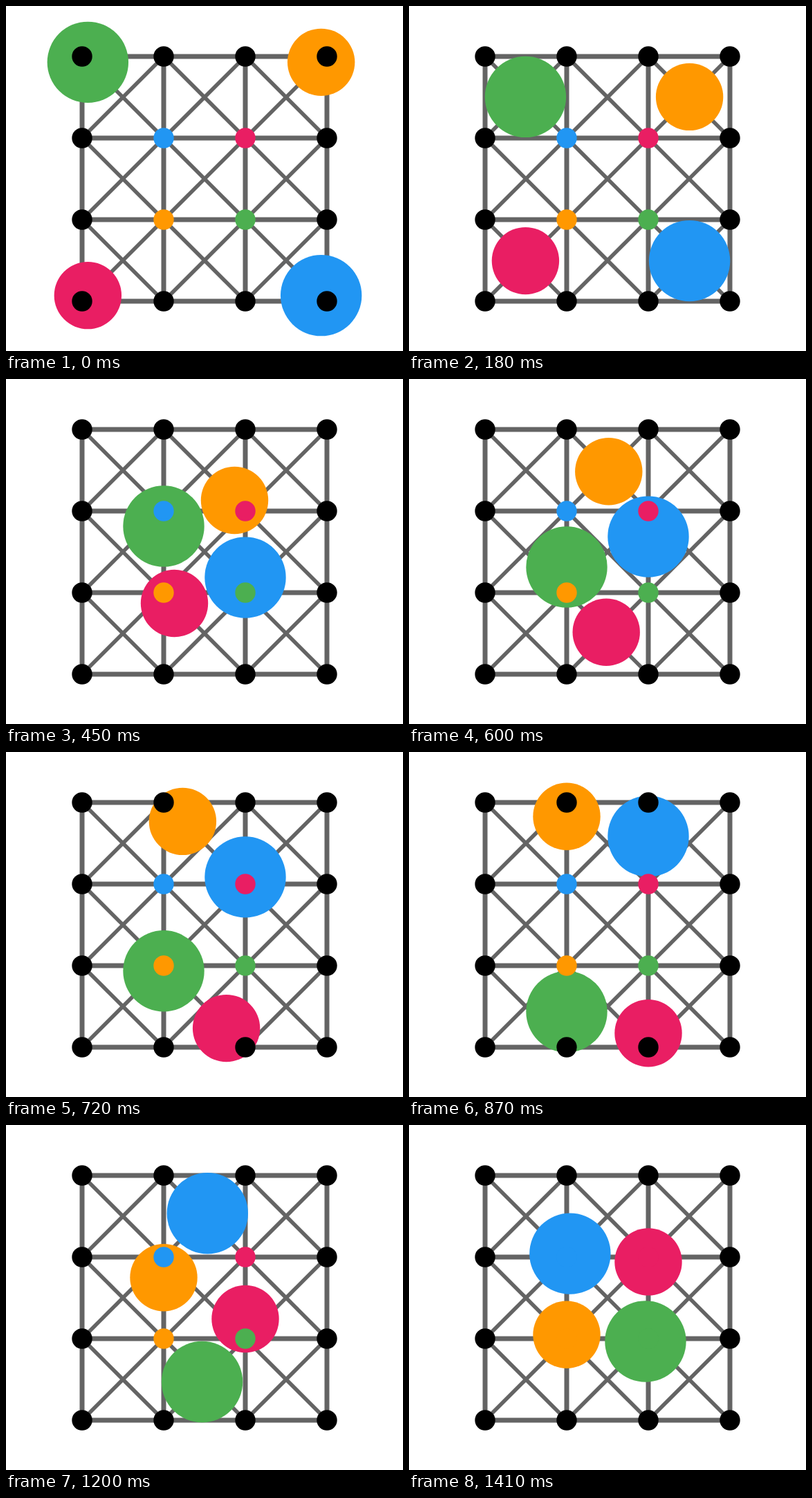
Write an HTML page that moves like this. It is 574 px wide and 499 px high and loops after 1440 ms.

```html
<!DOCTYPE html>
<html lang="en">
<head>
<meta charset="utf-8">
<title>Discs on a grid</title>
<style>
  html, body { margin: 0; width: 100%; height: 100%; overflow: hidden; background: #fff; }
  svg { display: block; width: 574px; height: 499px; }
</style>
</head>
<body>
<svg id="stage" viewBox="0 0 574 499"></svg>
<script>
const GAP = 118, LEFT = 110, TOP = 73;
const TICK = 30, TICKS = 48, SPEED = 11.8;
const GREEN = '#4caf50', ORANGE = '#ff9800', PINK = '#e91e63', BLUE = '#2196f3';
const stage = document.getElementById('stage');

const at = (col, row) => [LEFT + col * GAP, TOP + row * GAP];

function add(tag, attrs) {
  const el = document.createElementNS('http://www.w3.org/2000/svg', tag);
  for (const key in attrs) el.setAttribute(key, attrs[key]);
  return stage.appendChild(el);
}

function line(c1, r1, c2, r2, width) {
  const [x1, y1] = at(c1, r1), [x2, y2] = at(c2, r2);
  add('line', { x1, y1, x2, y2, stroke: '#646464', 'stroke-width': width });
}

function dot([cx, cy], r, fill) {
  return add('circle', { cx, cy, r, fill });
}

// Each path is a list of grid stops; rest[i] is the pause, in ticks, at stop i.
function disc(fill, r, stops, rest) {
  const points = stops.map(([c, row]) => at(c, row));
  const legs = [];
  let start = 0;
  for (let i = 1; i < points.length; i++) {
    const [a, b] = [points[i - 1], points[i]];
    const span = Math.hypot(b[0] - a[0], b[1] - a[1]) / SPEED;
    start += rest[i - 1] || 0;
    legs.push({ a, b, start, span });
    start += span;
  }
  return { el: dot(points[0], r, fill), legs };
}

function place({ el, legs }, tick) {
  const leg = legs.findLast(l => l.start <= tick);
  const k = Math.min(1, (tick - leg.start) / leg.span);
  el.setAttribute('cx', leg.a[0] + (leg.b[0] - leg.a[0]) * k);
  el.setAttribute('cy', leg.a[1] + (leg.b[1] - leg.a[1]) * k);
}

for (let c = 0; c < 3; c++) {
  for (let r = 0; r < 3; r++) {
    line(c, r, c + 1, r + 1, 5.5);
    line(c + 1, r, c, r + 1, 5.5);
  }
}
for (let i = 0; i < 4; i++) {
  line(0, i, 3, i, 7);
  line(i, 0, i, 3, 7);
}

const discs = [
  disc(GREEN, 58.7, [[0, 0], [1, 1], [1, 2], [1, 3], [2, 2]], [0, 0, 0.2]),
  disc(BLUE, 58.7, [[3, 3], [2, 2], [2, 1], [2, 0], [1, 1]], [0, 0, 0, 0.3]),
  disc(ORANGE, 48.7, [[3, 0], [2, 1], [1, 0], [1, 1], [1, 2]], [0, 0, 0, 0.2]),
  disc(PINK, 48.7, [[0, 3], [1, 2], [2, 3], [2, 2], [2, 1]], [0, 0, 0, 0.3])
];

const inner = { '1,1': BLUE, '2,1': PINK, '1,2': ORANGE, '2,2': GREEN };
for (let c = 0; c < 4; c++) {
  for (let r = 0; r < 4; r++) dot(at(c, r), 14.7, inner[[c, r]] || '#000');
}

let origin;
function draw(now) {
  origin ??= now;
  const tick = Math.floor((now - origin) / TICK) % TICKS + 1;
  discs.forEach(d => place(d, tick));
  requestAnimationFrame(draw);
}
discs.forEach(d => place(d, 1));
requestAnimationFrame(draw);
</script>
</body>
</html>
```
